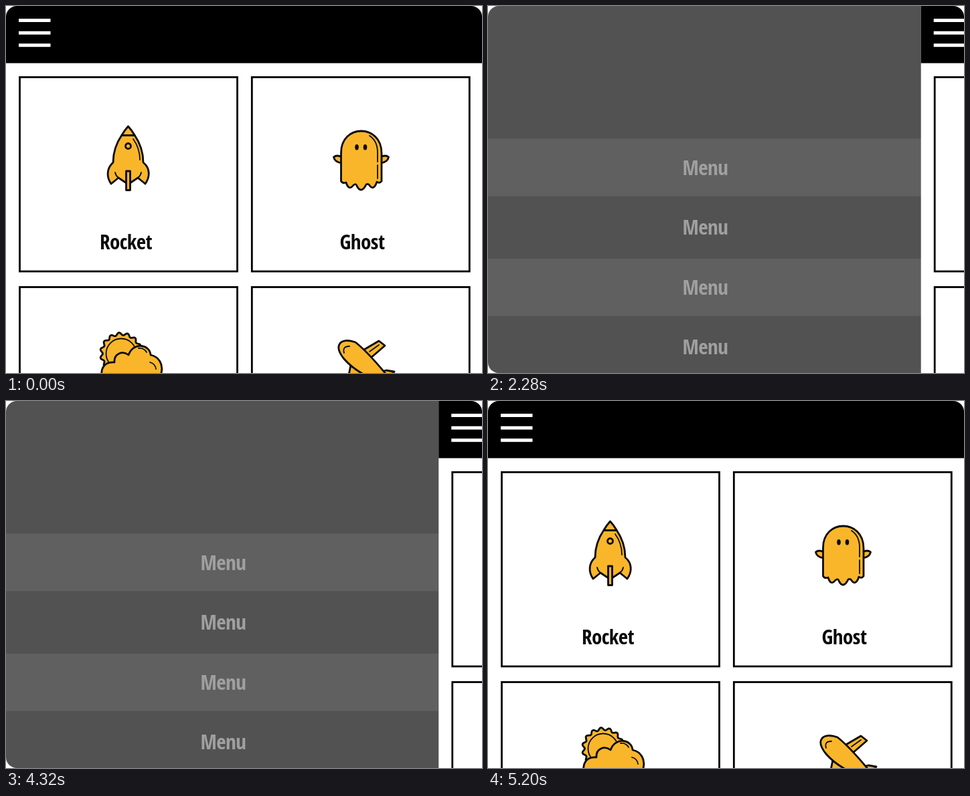
An HTML page with a canvas for the animation above (6080 ms loop, 711 px wide and 549 px high).

```html
<!DOCTYPE html>
<html lang="en">
<head>
<meta charset="utf-8">
<title>Slide-out menu</title>
<style>
  html, body { margin: 0; width: 100%; height: 100%; overflow: hidden; background: #fff; }
  canvas { display: block; width: 711px; height: 549px; border-radius: 16px; }
</style>
</head>
<body>
<canvas id="stage" width="711" height="549"></canvas>
<script>
const W = 711, H = 549, LOOP = 6080, STEP = 40;
const GOLD = '#f9b62b', INK = '#0b0b0b';
const FONT = 'condensed 31px "Open Sans Condensed", "Roboto Condensed", "Liberation Sans Narrow", Roboto, sans-serif';
const ctx = document.getElementById('stage').getContext('2d');

// Easing
const clamp = p => Math.min(1, Math.max(0, p));
const sine = p => (1 - Math.cos(Math.PI * p)) / 2;
const cubic = p => p < .5 ? 4 * p ** 3 : 1 - 4 * (1 - p) ** 3;
const backOut = p => 1 + 2.7 * (p - 1) ** 3 + 1.7 * (p - 1) ** 2;

// Page offset: [time, x, easing towards this key]
const slide = [
  [1667, 0],
  [2240, 652, cubic],
  [2400, 616, sine],
  [2520, 622, sine],
  [4040, 622, sine],
  [4280, 647, sine],
  [4883, -7, cubic],
  [4930, -7, sine],
  [5200, 0, sine]
];

function pageX(t) {
  if (t <= slide[0][0]) return 0;
  for (let i = 1; i < slide.length; i++) {
    const [t0, x0] = slide[i - 1], [t1, x1, ease] = slide[i];
    if (t < t1) return x0 + (x1 - x0) * ease((t - t0) / (t1 - t0));
  }
  return 0;
}

// Tap marker: pops in, holds, shrinks away
function tapScale(t, start) {
  if (t < start || t >= start + 1040) return 0;
  if (t <= start + 680) return backOut(clamp((t - start + STEP) / 520));
  return Math.max(0, backOut(1 - (t - start - 680) / 360));
}

function rect(x, y, w, h, color) {
  ctx.fillStyle = color;
  ctx.fillRect(x, y, w, h);
}

function label(text, x, y, color) {
  ctx.font = FONT;
  ctx.fontStretch = 'condensed';
  ctx.letterSpacing = '-0.5px';
  ctx.textAlign = 'center';
  ctx.fillStyle = color;
  ctx.fillText(text, x, y);
}

function outline(path, width = 2.8) {
  ctx.strokeStyle = INK;
  ctx.lineWidth = width;
  ctx.stroke(path);
}

function shape(path) {
  ctx.fillStyle = GOLD;
  ctx.fill(path);
  outline(path);
}

function disc(x, y, rx, ry = rx) {
  const p = new Path2D();
  p.ellipse(x, y, rx, ry, 0, 0, 7);
  return p;
}

const svg = d => new Path2D(d);

// Icons, drawn in page coordinates
const rocket = {
  body: svg('M182.5 180Q188 186 192 193Q205 212 205 234C216 243 215 256 208 266L197 257L185 265H180L168 257L157 266C150 256 150 243 160 234Q160 212 173 193Q177 186 182.5 180Z'),
  band: svg('M173 193.5H192'),
  fin: svg('M179.5 247H185.5V275.5H179.5Z'),
  shine: svg('M190 199Q200 213 200 230M168 257Q164 254 163 249M197 257Q201 254 202 249')
};
const ghost = {
  arms: svg('M502 226Q494 222 489.5 226Q491 234 502 235ZM559 226Q567 222 571.5 226Q570 234 559 235Z'),
  body: svg('M500.5 262V220C500 176 561 176 561 220V262Q558 266 554 263Q549 278 542 267Q538 265 537 269Q530 281 524 269Q523 265 519 268Q512 277 508 264Q503 266 500.5 262Z'),
  shine: svg('M543 194Q555 202 555 219V233M555 238V258')
};
const cloud = {
  body: svg('M144 562C140 545 144 532 162 533C161 520 174 515 183 522C190 502 215 506 216 522C229 525 235 536 232 549L230 562Z'),
  shine: svg('M198 512Q206 511 210 518M215 533Q223 535 224 543')
};
const sun = new Path2D();
for (let i = 0; i <= 240; i++) {
  const a = i / 240 * 2 * Math.PI, r = 29.5 + 2 * Math.cos(a * 15);
  sun.lineTo(172 + r * Math.cos(a), 520 + r * Math.sin(a));
}
const plane = {
  wing: svg('M528 518L557 501L566 508L543 528Z'),
  low: svg('M516 532L510 562H528L538 544Z'),
  tail: svg('M553 549L568 545L580 547L566 560Z'),
  body: svg('M505 528C488 507 500 495 522 503Q541 518 572 556L566 564Q526 552 505 528Z'),
  shine: svg('M505 519Q502 509 513 509M543 517L557 507')
};

function icons() {
  ctx.lineJoin = ctx.lineCap = 'round';
  shape(rocket.body);
  outline(rocket.band);
  shape(rocket.fin);
  shape(disc(182.5, 209.5, 4));
  outline(rocket.shine, 1.8);

  shape(ghost.arms);
  shape(ghost.body);
  ctx.fillStyle = INK;
  for (const x of [524, 536.5]) ctx.fill(disc(x, 211.3, 2.8, 4.2));
  outline(ghost.shine, 1.8);

  shape(sun);
  outline(disc(172, 520, 22.5), 1.8);
  shape(cloud.body);
  outline(cloud.shine, 1.8);

  shape(plane.wing);
  shape(plane.low);
  shape(plane.tail);
  shape(plane.body);
  outline(plane.shine, 1.8);
}

function menu() {
  rect(0, 0, W, H, '#525252');
  for (const [y, h] of [[198.5, 86], [378, 85.5]]) rect(0, y, W, h, '#606060');
  for (const y of [253, 342, 431.5, 520.5]) label('Menu', 324.5, y, '#a0a0a0');
}

function page() {
  rect(0, 0, W, H, '#fff');
  rect(0, 0, W, 85.5, '#000');
  for (const y of [19, 37.7, 56.2]) rect(19, y, 47.5, 5, '#fff');
  ctx.lineJoin = 'miter';
  ctx.strokeStyle = '#000';
  ctx.lineWidth = 2.8;
  for (const x of [20.5, 367.3])
    for (const y of [106.5, 420.5]) ctx.strokeRect(x, y, 325, 290.5);
  icons();
  label('Rocket', 179, 364, INK);
  label('Ghost', 532, 364, INK);
}

function tap(x, scale) {
  if (scale <= 0) return;
  ctx.fillStyle = '#000';
  ctx.fill(disc(x, 48.5, 29 * scale));
  ctx.fillStyle = GOLD;
  ctx.fill(disc(x, 48.5, 26 * scale));
}

function draw() {
  const t = Math.floor(performance.now() % LOOP / STEP) * STEP;
  menu();
  ctx.save();
  ctx.translate(pageX(t), 0);
  page();
  ctx.restore();
  tap(53, tapScale(t, 800));
  tap(667, tapScale(t, 3000));
  requestAnimationFrame(draw);
}
draw();
</script>
</body>
</html>
```
